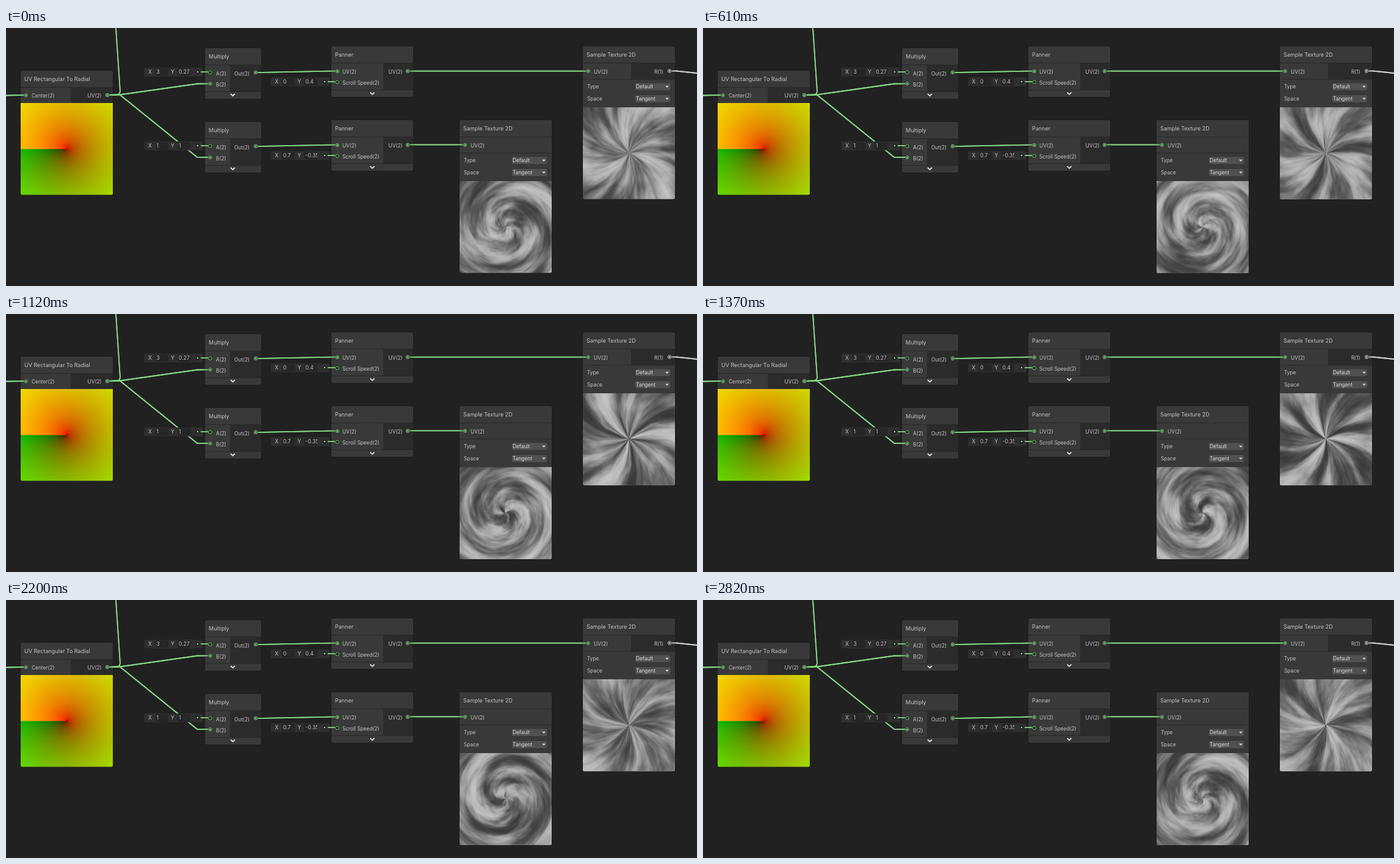
Recreate the animation shown at these times as an HTML page with a canvas. Size 1132 by 423 pixels, loop 2870 ms.

```html
<!DOCTYPE html>
<html lang="en">
<head>
<meta charset="utf-8">
<title>Node graph</title>
<style>
html, body { margin: 0; width: 100%; height: 100%; overflow: hidden; background: #212121; }
canvas { display: block; width: 1132px; height: 423px; }
</style>
</head>
<body>
<canvas id="stage" width="1132" height="423"></canvas>
<script>
const ctx = document.getElementById('stage').getContext('2d');
const GREEN = '#84d584', TEXT = '#c4c4c4', HEAD = '#393939', DARK = '#2b2b2b', EDGE = '#1b1b1b';
const LOOP = 2870, STEPS = 56, SIZE = 151, TEX = 256;
const LONG_STEPS = new Set([9, 20, 27, 34, 41, 48, 53]);

// ---------- static graph ----------
function rect(x, y, w, h, fill, r = 0) {
  ctx.fillStyle = fill;
  ctx.beginPath();
  ctx.roundRect(x, y, w, h, r);
  ctx.fill();
}

function label(str, x, y, size = 8.3, color = TEXT) {
  ctx.font = `${size}px Inter, "Open Sans", sans-serif`;
  ctx.fillStyle = color;
  ctx.fillText(str, x, y + 3);
}

function wire(points, color = GREEN) {
  ctx.strokeStyle = color;
  ctx.lineWidth = 1.8;
  ctx.lineJoin = 'round';
  ctx.beginPath();
  points.forEach(([x, y]) => ctx.lineTo(x, y));
  ctx.stroke();
}

function port(x, y, filled = true, color = GREEN) {
  rect(x - 3.6, y - 3.6, 7.2, 7.2, '#1e1e1e', 2);
  ctx.strokeStyle = color;
  ctx.lineWidth = 1;
  ctx.beginPath();
  ctx.roundRect(x - 2.6, y - 2.6, 5.2, 5.2, 1.6);
  ctx.stroke();
  if (filled) rect(x - 1.4, y - 1.4, 2.8, 2.8, color, 1.2);
}

function chevron(x, y) {
  ctx.strokeStyle = '#e2e2e2';
  ctx.lineWidth = 1.8;
  ctx.lineJoin = 'miter';
  ctx.beginPath();
  ctx.moveTo(x - 3.5, y - 1.7);
  ctx.lineTo(x, y + 1.5);
  ctx.lineTo(x + 3.5, y - 1.7);
  ctx.stroke();
}

function frame(x, y, w, h, title, headH) {
  rect(x - 0.7, y - 0.7, w + 1.4, h + 1.4, EDGE, 2.5);
  rect(x, y, w, h, HEAD, 2);
  rect(x, y + headH, w, 1, '#272727');
  label(title, x + 6, y + 13.5, 9);
}

function values(x, y, a, b) {
  rect(x, y, 96, 14.5, '#2f2f2f', 2);
  label('X', x + 6.5, y + 7, 8.6);
  label('Y', x + 43.5, y + 7, 8.6);
  [[a, 18], [b, 54.5]].forEach(([v, dx]) => {
    rect(x + dx, y + 1.2, 21.5, 12, '#262626', 1.5);
    ctx.save();
    ctx.beginPath();
    ctx.rect(x + dx, y, 21.5, 14);
    ctx.clip();
    label(v, x + dx + 2, y + 7, 8.6);
    ctx.restore();
  });
}

function valueLink(x, y, end) {
  rect(x - 3, y - 3, 6, 6, '#222', 3);
  rect(x - 1.3, y - 1.3, 2.6, 2.6, GREEN, 1.3);
  wire([[x + 5, y], [end, y]]);
}

function multiply(x, y, a, b) {
  frame(x, y, 92, 83, 'Multiply', 27);
  rect(x + 41, y + 28, 51, 43, DARK);
  rect(x, y + 71, 92, 1, '#272727');
  chevron(x + 45.5, y + 76.7);
  label('A(2)', x + 18, y + 41.5);
  label('B(2)', x + 18, y + 59.5);
  label('Out(2)', x + 48, y + 41.5);
  values(x - 99.5, y + 32, a, b);
}

function panner(x, y, a, b) {
  frame(x, y, 134, 83, 'Panner', 27);
  rect(x + 85, y + 28, 49, 43, DARK);
  rect(x, y + 71, 134, 1, '#272727');
  chevron(x + 67, y + 77.3);
  label('UV(2)', x + 18, y + 42);
  label('Scroll Speed(2)', x + 18, y + 60.3);
  label('UV(2)', x + 93.5, y + 42);
  values(x - 99, y + 51, a, b);
}

function dropdown(name, value, x, y) {
  label(name, x + 7, y);
  rect(x + 85, y - 6.3, 59, 12.6, '#282828', 2);
  rect(x + 85.5, y - 6, 58, 12, '#505050', 2);
  label(value, x + 87, y, 8.3, '#dedede');
  ctx.fillStyle = '#d0d0d0';
  ctx.beginPath();
  ctx.moveTo(x + 135, y - 1.5);
  ctx.lineTo(x + 141, y - 1.5);
  ctx.lineTo(x + 138, y + 1.8);
  ctx.fill();
}

function sampler(x, y, hasOut) {
  frame(x, y, 151, 250.5, 'Sample Texture 2D', 27);
  if (hasOut) {
    rect(x + 79, y + 28, 72, 26, DARK);
    label('R(1)', x + 117, y + 41.5);
  }
  rect(x, y + 53.5, 151, 1, '#272727');
  label('UV(2)', x + 18, y + 41.5);
  dropdown('Type', 'Default', x, y + 66.3);
  dropdown('Space', 'Tangent', x, y + 86);
}

function wires() {
  wire([[0, 110.5], [24, 110], [30, 110]]);
  wire([[169, 110], [181, 109.5], [185.5, 108], [187, 104], [180, 0]]);
  wire([[169, 110], [186, 109.5], [313, 91.5], [331, 91.3]]);
  wire([[186, 109], [313, 211.8], [331, 212]]);
  for (const dy of [0, 121]) {
    wire([[412, 73 + dy], [420, 72.8 + dy], [532, 70.6 + dy], [540, 70.6 + dy]]);
  }
  wire([[661, 70.6], [950, 70.6]]);
  wire([[661, 191.4], [749, 191.4]]);
  wire([[1090, 70.5], [1098, 70.5], [1132, 74]], '#c8c8c8');
}

function ports() {
  port(32.7, 110.3);
  port(166, 110);
  for (const dy of [0, 121]) {
    valueLink(314, 72 + dy, 332);
    port(334.5, 72.8 + dy, false);
    port(334.5, 91.3 + dy);
    port(409, 72.8 + dy);
    valueLink(522, 88 + dy, 540);
    port(542.7, 71 + dy);
    port(542.7, 88.8 + dy, false);
    port(658, 70.7 + dy);
  }
  port(953.7, 70.7);
  port(752, 191.7);
  port(1087, 70.5, true, '#c8c8c8');
}

// ---------- polar field ----------
const angle = new Float32Array(SIZE * SIZE), radius = new Float32Array(SIZE * SIZE);
for (let y = 0, i = 0; y < SIZE; y++) {
  for (let x = 0; x < SIZE; x++, i++) {
    const dx = (x + 0.5) / SIZE - 0.5, dy = 0.5 - (y + 0.5) / SIZE;
    angle[i] = Math.atan2(dy, dx) / (2 * Math.PI) + 0.5;
    radius[i] = Math.hypot(dx, dy);
  }
}

function buffer() {
  const canvas = document.createElement('canvas');
  canvas.width = canvas.height = SIZE;
  const c = canvas.getContext('2d'), img = c.createImageData(SIZE, SIZE);
  img.data.fill(255);
  return { canvas, c, img };
}

function show(buf, x, y) {
  buf.c.putImageData(buf.img, 0, 0);
  ctx.save();
  ctx.beginPath();
  ctx.roundRect(x, y, SIZE, SIZE, [0, 0, 2.5, 2.5]);
  ctx.clip();
  ctx.drawImage(buf.canvas, x, y);
  ctx.restore();
}

function radialPreview() {
  const buf = buffer(), d = buf.img.data;
  const gamma = v => 255 * (v < 0.0031 ? 12.92 * v : 1.055 * v ** (1 / 2.4) - 0.055);
  for (let i = 0; i < angle.length; i++) {
    d[i * 4] = gamma(angle[i]);
    d[i * 4 + 1] = gamma(radius[i]);
    d[i * 4 + 2] = 0;
  }
  show(buf, 24, 122.5);
}

// ---------- tiling cloud texture ----------
function hash(x, y, s) {
  let h = Math.imul(x, 374761393) ^ Math.imul(y, 668265263) ^ Math.imul(s, 974634541);
  h = Math.imul(h ^ (h >>> 13), 1274126177);
  h = Math.imul(h ^ (h >>> 15), 2246822519);
  return ((h ^ (h >>> 16)) >>> 0) / 4294967296;
}

function gradNoise(u, v, n, s) {
  const x = u * n, y = v * n, xi = Math.floor(x), yi = Math.floor(y), fx = x - xi, fy = y - yi;
  const fade = t => t * t * t * (t * (t * 6 - 15) + 10);
  const wrap = a => ((a % n) + n) % n;
  const corner = (i, j) => {
    const a = hash(wrap(xi + i), wrap(yi + j), s) * 2 * Math.PI;
    return Math.cos(a) * (fx - i) + Math.sin(a) * (fy - j);
  };
  const mix = (a, b, t) => a + (b - a) * t;
  const p = fade(fx), q = fade(fy);
  return mix(mix(corner(0, 0), corner(1, 0), p), mix(corner(0, 1), corner(1, 1), p), q);
}

function cloudTexture() {
  const tex = new Float32Array(TEX * TEX);
  let sum = 0, sq = 0;
  for (let i = 0; i < tex.length; i++) {
    const u = (i % TEX) / TEX, v = Math.floor(i / TEX) / TEX;
    let amp = 1, n = 4, val = 0;
    for (let o = 0; o < 5; o++, n *= 2, amp *= 0.56) val += amp * gradNoise(u + v, v, n, o + 7);
    tex[i] = val;
    sum += val;
    sq += val * val;
  }
  const mean = sum / tex.length, dev = Math.sqrt(sq / tex.length - mean * mean);
  return tex.map(v => 126 + 78 * Math.tanh((v - mean) / dev * 0.52));
}

const clouds = cloudTexture();

function sample(u, v) {
  const x = (u - Math.floor(u)) * TEX, y = (v - Math.floor(v)) * TEX;
  const xi = Math.floor(x), yi = Math.floor(y), fx = x - xi, fy = y - yi, m = TEX - 1;
  const x0 = xi & m, x1 = (xi + 1) & m, r0 = (yi & m) * TEX, r1 = ((yi + 1) & m) * TEX;
  const a = clouds[r0 + x0], b = clouds[r0 + x1], c = clouds[r1 + x0], d = clouds[r1 + x1];
  return a + (b - a) * fx + (c - a + (a - b - c + d) * fx) * fy;
}

function pan(buf, su, sv, du, dv) {
  const d = buf.img.data;
  for (let i = 0; i < angle.length; i++) {
    const g = sample(angle[i] * su + du, radius[i] * sv + dv);
    d[i * 4] = d[i * 4 + 1] = d[i * 4 + 2] = g;
  }
}

// ---------- playback ----------
const starts = [0];
for (let k = 0; k < STEPS - 1; k++) starts.push(starts[k] + (LONG_STEPS.has(k) ? 60 : 50));

const rays = buffer(), swirl = buffer();
let shown = -1;

function draw(now) {
  const t = now % LOOP;
  let k = STEPS - 1;
  while (starts[k] > t) k--;
  if (k !== shown) {
    shown = k;
    const s = starts[k] / 1000;
    pan(rays, 3, 0.27, 0, 0.4 * s);
    pan(swirl, 1, 1, 0.7 * s, -0.35 * s);
    show(rays, 945, 129.5);
    show(swirl, 743, 250.5);
  }
  requestAnimationFrame(() => draw(performance.now()));
}

rect(0, 0, 1132, 423, '#212121');
frame(24, 70, 151, 203, 'UV Rectangular To Radial', 27);
rect(106, 98, 69, 25, DARK);
label('Center(2)', 42, 111);
label('UV(2)', 133.5, 111);
radialPreview();
wires();
multiply(326, 33, '3', '0.27');
multiply(326, 154, '1', '1');
panner(533, 30, '0', '0.4');
panner(533, 151, '0.7', '-0.35');
sampler(945, 30, true);
sampler(743, 151, false);
ctx.save();
ctx.beginPath();
ctx.rect(0, 0, 1132, 423);
ctx.rect(226.5, 186, 96, 15);
ctx.clip('evenodd');
wires();
ctx.restore();
ports();
draw(performance.now());
</script>
</body>
</html>
```
